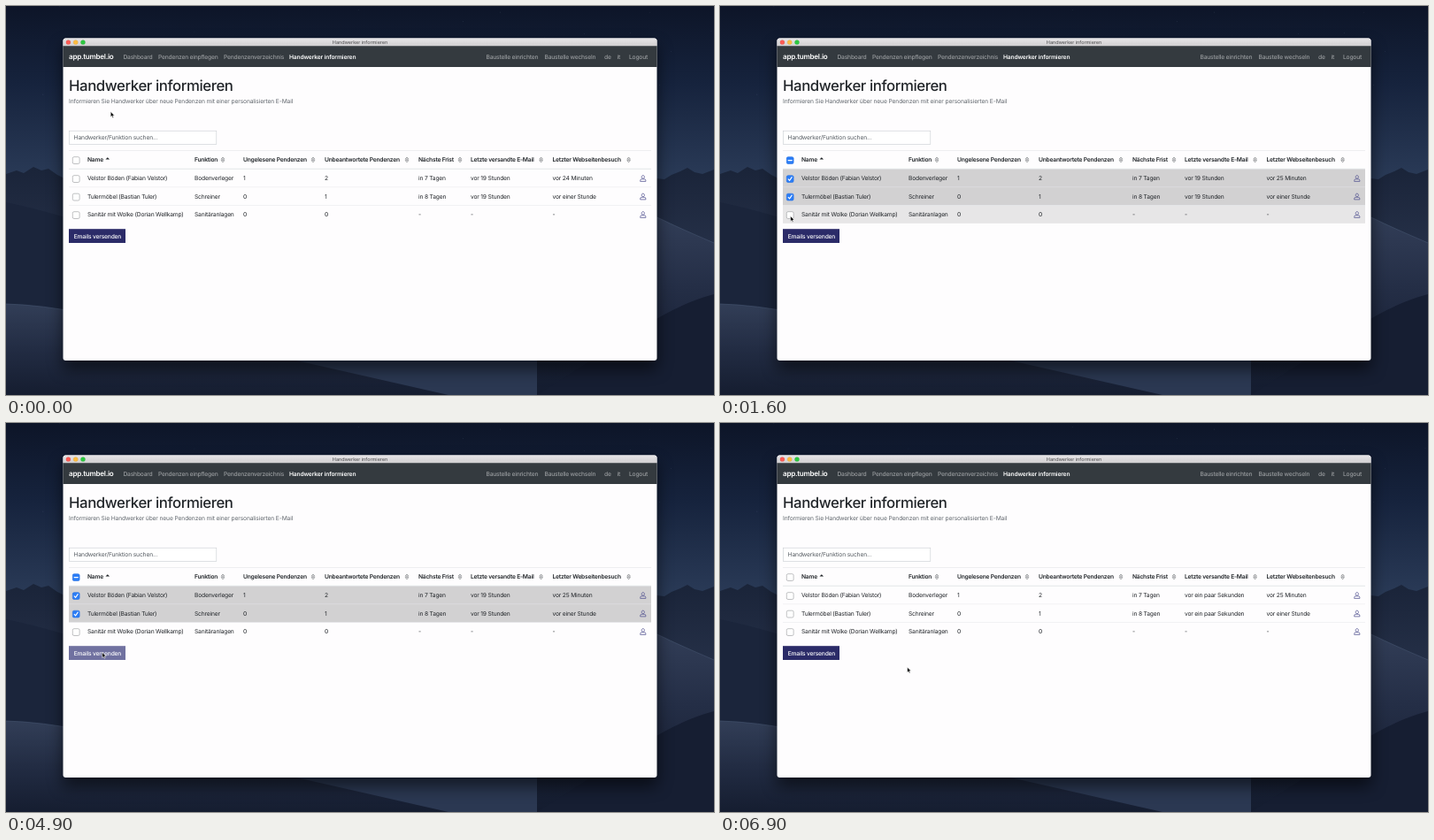
Write an HTML page that moves like this. It is 800 px wide and 440 px high and loops after 7 s.

```html
<!DOCTYPE html>
<html lang="de">
<head>
<meta charset="utf-8">
<title>Handwerker informieren</title>
<style>
  html, body { margin: 0; width: 100%; height: 100%; overflow: hidden; background: #10182a; }
  svg { display: block; width: 800px; height: 440px; }
  text {
    font: 400 6.7px Inter, "Open Sans", sans-serif;
    letter-spacing: -.18px;
    fill: #212529;
    text-rendering: geometricPrecision;
    white-space: pre;
  }
  .title { font-size: 5.5px; letter-spacing: -.03px; fill: #4b4a4c; }
  .brand { font-size: 8.1px; font-weight: 600; letter-spacing: -.27px; fill: #fff; }
  .link { font-weight: 500; letter-spacing: -.21px; fill: #999c9f; }
  .active { font-weight: 600; letter-spacing: -.15px; fill: #fff; }
  .h1 { font-size: 16.8px; font-weight: 500; letter-spacing: -.42px; }
  .lead { letter-spacing: -.13px; fill: #62686e; }
  .hint { fill: #555b61; letter-spacing: -.13px; }
  .th { font-weight: 600; letter-spacing: -.23px; }
  .btn { font-weight: 500; fill: #fff; }
  .alert { font-weight: 500; fill: #24532f; letter-spacing: -.12px; }
  .mid { text-anchor: middle; }
</style>
</head>
<body>
<svg id="stage" viewBox="0 0 800 440" xmlns="http://www.w3.org/2000/svg">
  <defs>
    <linearGradient id="sky" x2="0" y2="1">
      <stop offset="0" stop-color="#0d1528"/>
      <stop offset=".2" stop-color="#16233d"/>
      <stop offset=".48" stop-color="#2d3e5b"/>
      <stop offset=".6" stop-color="#2b3852"/>
    </linearGradient>
    <linearGradient id="range" x2="0" y2="1">
      <stop offset="0" stop-color="#1a2439"/>
      <stop offset="1" stop-color="#27324a"/>
    </linearGradient>
    <linearGradient id="duneL" x2="0" y2="1">
      <stop offset="0" stop-color="#323e57"/>
      <stop offset=".5" stop-color="#222c43"/>
      <stop offset="1" stop-color="#151d30"/>
    </linearGradient>
    <linearGradient id="duneR" x2="0" y2="1">
      <stop offset="0" stop-color="#35415b"/>
      <stop offset=".45" stop-color="#242e46"/>
      <stop offset="1" stop-color="#141c2f"/>
    </linearGradient>
    <linearGradient id="bar" x2="0" y2="1">
      <stop offset="0" stop-color="#e9e7e9"/>
      <stop offset="1" stop-color="#d0ced0"/>
    </linearGradient>
    <filter id="blur" x="-20%" y="-20%" width="140%" height="140%">
      <feGaussianBlur stdDeviation="9"/>
    </filter>
    <clipPath id="frame"><rect x="64.5" y="36.5" width="671" height="364.5" rx="3"/></clipPath>
  </defs>

  <rect width="800" height="440" fill="url(#sky)"/>
  <g id="stars" fill="#8fa0bd"></g>
  <path fill="url(#range)" d="M0 190L12 186 20 189 31 182 40 186 48 184 58 191 66 195H735L744 196 752 191 762 187 770 183 778 188 787 190 800 185V290H0Z"/>
  <path fill="#1b253b" d="M0 222Q34 229 70 240V345H0Z"/>
  <path fill="url(#duneR)" d="M600 220Q700 222 740 241T800 268V440H600Z"/>
  <path fill="#161e32" d="M800 326Q762 336 720 363L600 440H800Z"/>
  <path fill="url(#duneL)" d="M0 337Q40 338 90 348T500 440H0Z"/>
  <path fill="none" stroke="#465470" stroke-width=".6" d="M0 337Q40 338 90 348M700 226Q722 232 740 241T800 268"/>

  <rect x="64" y="45" width="672" height="366" rx="4" opacity=".55" filter="url(#blur)"/>
  <g id="window" clip-path="url(#frame)">
    <rect x="64" y="36" width="672" height="366" fill="#fefdfe"/>
    <rect x="64" y="36" width="672" height="9.2" fill="url(#bar)"/>
  </g>
  <path id="cursor" stroke="#fff" stroke-width=".6" stroke-linejoin="round"
    d="M0 0V6.1L1.4 4.8 2.3 6.9 3.4 6.4 2.5 4.4H4.4Z"/>
</svg>
<script>
const NS = 'http://www.w3.org/2000/svg';
const LOOP = 7000;
const win = document.getElementById('window');
const cursor = document.getElementById('cursor');

function add(tag, attrs, parent = win) {
  const el = document.createElementNS(NS, tag);
  for (const k in attrs) el.setAttribute(k, attrs[k]);
  return parent.appendChild(el);
}
function text(x, y, str, cls = '', parent = win) {
  const el = add('text', { x, y, class: cls }, parent);
  el.textContent = str;
  return el;
}
const box = (x, y, width, height, fill, parent) => add('rect', { x, y, width, height, fill }, parent);
const line = (y, w, color) => box(71, y, 658, w, color);
const show = (el, on) => el.setAttribute('visibility', on ? 'visible' : 'hidden');

// night sky
let seed = 7;
const rand = () => (seed = seed * 16807 % 2147483647) / 2147483647;
for (let i = 0; i < 45; i++)
  add('circle', { cx: rand() * 800, cy: rand() * 130, r: .2 + rand() * .25, opacity: .2 + rand() * .4 },
    document.getElementById('stars'));

// title bar
['#fc5b55', '#fdbc40', '#2cc840'].forEach((fill, i) =>
  add('circle', { cx: 70.4 + i * 8.3, cy: 41, r: 2.6, fill, stroke: '#0003', 'stroke-width': .3 }));
text(400, 43, 'Handwerker informieren', 'title mid');

// navigation
box(64, 45.2, 672, 23.8, '#343a3f');
text(71, 60.1, 'app.tumbel.io', 'brand');
[[132.5, 'Dashboard'], [172, 'Pendenzen einpflegen'], [246, 'Pendenzenverzeichnis'],
 [542.5, 'Baustelle einrichten'], [608.5, 'Baustelle wechseln'], [676, 'de'], [690.5, 'it'], [704, 'Logout']]
  .forEach(([x, s]) => text(x, 59.7, s, 'link'));
text(320, 59.7, 'Handwerker informieren', 'active');

// confirmation
const alertBox = add('g', {});
box(64, 45.2, 672, 24.3, '#c9ead2', alertBox);
text(400, 59.9, 'Emails versandt', 'alert mid', alertBox);
add('path', { d: 'M721.3 54.8l4 4m0 -4l-4 4', stroke: '#5f7767', 'stroke-width': 1.3 }, alertBox);

// page head
text(71, 96, 'Handwerker informieren', 'h1');
text(71, 110.3, 'Informieren Sie Handwerker über neue Pendenzen mit einer personalisierten E-Mail', 'lead');
add('rect', { x: 71.4, y: 141.2, width: 166.4, height: 15.4, fill: '#fff', stroke: '#c9cdd2', 'stroke-width': .6 });
text(76.6, 151.3, 'Handwerker/Funktion suchen...', 'hint');

// table
const COLS = [92, 213, 268, 360, 466, 525, 617.5];
const HEAD = ['Name', 'Funktion', 'Ungelesene Pendenzen', 'Unbeantwortete Pendenzen',
  'Nächste Frist', 'Letzte versandte E-Mail', 'Letzter Webseitenbesuch'];
const DATA = [
  ['Velstor Böden (Fabian Velstor)', 'Bodenverleger', '1', '2', 'in 7 Tagen', '', ''],
  ['Tulermöbel (Bastian Tuler)', 'Schreiner', '0', '1', 'in 8 Tagen', '', 'vor einer Stunde'],
  ['Sanitär mit Wolke (Dorian Wellkamp)', 'Sanitäranlagen', '0', '0', '-', '-', '-']
];
const ROW_TOP = 184.4, ROW_H = 20.5;

function checkbox(cy) {
  const g = add('g', { transform: `translate(79.2 ${cy})` });
  const frame = add('rect', { x: -3.9, y: -3.9, width: 7.8, height: 7.8, rx: 1.6, 'stroke-width': .6 }, g);
  const mark = add('path', { fill: 'none', stroke: '#fff', 'stroke-width': 1.1, 'stroke-linecap': 'round' }, g);
  return state => {
    frame.setAttribute('fill', state ? '#2b7df6' : '#fff');
    frame.setAttribute('stroke', state ? '#2470e2' : '#96979b');
    mark.setAttribute('d', state === 'some' ? 'M-2.1 0H2.1' : state ? 'M-2 .2L-.6 1.8 2 -2' : '');
  };
}

line(163.2, .5, '#dcdfe3');
HEAD.forEach((s, i) => text(COLS[i], 176.2, s, 'th'));
add('path', { d: 'M112.5 173.6L114.8 171.2 117.1 173.6Z', fill: '#212529' });
[245, 347, 453, 513, 604.6, 703.6].forEach(x => add('path', {
  d: `M${x - 1.8} 173.2l1.8 -2.2 1.8 2.2zm0 1.4l1.8 2.2 1.8 -2.2z`,
  fill: 'none', stroke: '#4a4e53', 'stroke-width': .5 }));
const checkAll = checkbox(174.6);

const rows = DATA.map((cells, i) => {
  const y = ROW_TOP + i * ROW_H;
  const back = box(71, y, 658, ROW_H, 'none');
  if (i) line(y - .2, .4, '#dcdfe3');
  const labels = cells.map((s, c) => text(COLS[c], y + 12.7, s));
  add('path', {
    d: `M716.7 ${y + 14}v-.9q0 -1.7 1.7 -1.7h2.8q1.7 0 1.7 1.7v.9zM719.8 ${y + 7.2}a1.6 1.8 0 1 1 -.01 0z`,
    fill: 'none', stroke: '#50518f', 'stroke-width': .75 });
  return { y, back, labels, check: checkbox(y + 11.2) };
});
line(183.8, .8, '#dcdfe3');

const button = box(71, 252.2, 64, 15.8, '#2b2b68');
text(76.7, 262.6, 'Emails versenden', 'btn');

// time, x, y of the pointer tip
const PATH = [
  [0, 118.2, 119.5], [100, 118.2, 119.5], [550, 82, 174.6], [1000, 82, 174.6],
  [1400, 79.6, 237.6], [1750, 79.6, 237.6], [2400, 108.7, 259.4], [5400, 108.7, 259.4],
  [6000, 212.4, 278.4], [6350, 212.4, 278.4], [6700, 211.6, 276.2], [LOOP, 211.6, 276.2]
];
function pointer(t) {
  const i = PATH.findIndex((p, n) => n && t < p[0]);
  const [t0, x0, y0] = PATH[i - 1], [t1, x1, y1] = PATH[i];
  const u = (t - t0) / (t1 - t0), e = u * u * (3 - 2 * u);
  return [x0 + (x1 - x0) * e, y0 + (y1 - y0) * e];
}

function render(t) {
  const [x, y] = pointer(t);
  const sent = t >= 5000;
  const all = t >= 600 && !sent;
  const partial = t >= 1500 && !sent;

  cursor.setAttribute('transform', `translate(${x} ${y})`);
  checkAll(partial ? 'some' : all);
  rows.forEach((row, i) => {
    const on = all && !(partial && i === 2);
    const hover = x > 71 && x < 729 && y >= row.y && y < row.y + ROW_H;
    row.check(on);
    row.back.setAttribute('fill', on ? '#d2d1d2' : hover ? '#e7e6e7' : 'none');
    if (i < 2) row.labels[5].textContent = sent ? 'vor ein paar Sekunden' : 'vor 19 Stunden';
  });
  rows[0].labels[6].textContent = t < 400 ? 'vor 24 Minuten' : 'vor 25 Minuten';

  const over = x > 71 && x < 135 && y > 252 && y < 268;
  button.setAttribute('fill', over ? '#7071a0' : '#2b2b68');
  show(alertBox, sent && t < 6700);
  alertBox.setAttribute('opacity', Math.min(1, Math.max(0, (6700 - t) / 150)));
}

function tick() {
  render(performance.now() % LOOP);
  requestAnimationFrame(tick);
}
tick();
</script>
</body>
</html>
```
